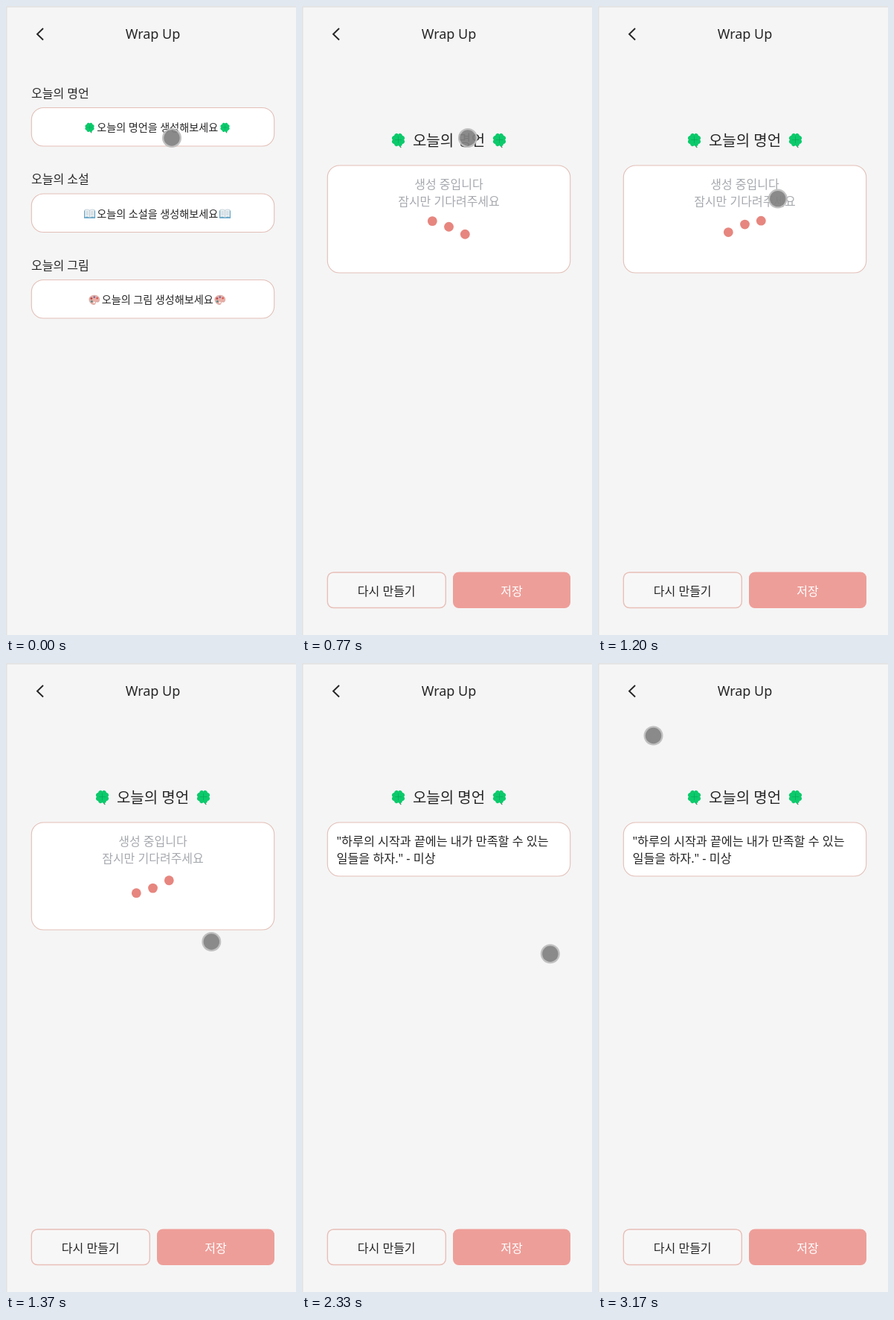
Animation, 390 px wide and 844 px high, one loop 3230 ms. Source, as an HTML page:

```html
<!DOCTYPE html>
<html lang="ko">
<head>
<meta charset="utf-8">
<title>Wrap Up</title>
<style>
  html, body { margin: 0; width: 100%; height: 100%; overflow: hidden; background: #f5f5f5; }
  svg { display: block; }
  text { font: 500 16px "Noto Sans", "Noto Sans CJK KR", "Noto Sans CJK", sans-serif; fill: #252525; }
  .mid { text-anchor: middle; }
  .head { font-size: 18px; font-weight: 400; }
  .hint { font-size: 14.1px; font-weight: 400; }
  .title { font-size: 20px; }
  .wait { fill: #a6a9ae; }
  .quote { font-size: 16.2px; font-weight: 400; }
  .card { fill: #fff; stroke: #e3bfb8; stroke-width: 1.1; }
  .dots { fill: #e6867f; }
</style>
</head>
<body>
<svg width="390" height="844" viewBox="0 0 390 844">
  <defs>
    <symbol id="clover" viewBox="0 0 20 22" overflow="visible">
      <path d="M10 10Q10.5 18 13.5 20.5" fill="none" stroke="#3d9060" stroke-width="1.6" stroke-linecap="round"/>
      <g fill="#0cca6c">
        <path id="leaf" d="M10 10C5 9 3.500 5.500 4.600 2.800C6 .3 9 .6 10 2.200C11 .6 14 .3 15.400 2.800C16.500 5.500 15 9 10 10Z"/>
        <use href="#leaf" transform="rotate(90 10 10)"/>
        <use href="#leaf" transform="rotate(180 10 10)"/>
        <use href="#leaf" transform="rotate(270 10 10)"/>
      </g>
      <path d="M10 5V15M5 10H15" stroke="#08a958" stroke-width=".8"/>
    </symbol>
    <symbol id="book" viewBox="0 0 16 14" overflow="visible">
      <path d="M.5 2.500H15.500V12.800H.5Z" fill="#4f9cc4"/>
      <path d="M1.500 1.500Q5 .2 8 2Q11 .2 14.500 1.500V11.300Q11 10.200 8 11.800Q5 10.200 1.500 11.300Z" fill="#edf3f6" stroke="#a9bdc8" stroke-width=".6"/>
      <path d="M8 2V11.800M3 4H6.500M3 6H6.500M3 8H6.500M9.500 4H13M9.500 6H13M9.500 8H13" stroke="#a9bac5" stroke-width=".7"/>
    </symbol>
    <symbol id="palette" viewBox="0 0 16 14" overflow="visible">
      <path d="M1 7C0 2 6 0 10 .7C15 1.500 16 6 14.500 9C13 11 11.500 8.500 10 10C9 11.500 10 13.200 7.500 13.200C4 13.200 1.500 10.500 1 7Z" fill="#e9b0a8" stroke="#c98e87" stroke-width=".6"/>
      <circle cx="4" cy="5" r="1.500" fill="#b94b4b"/>
      <circle cx="8" cy="3" r="1.400" fill="#7b6e9c"/>
      <circle cx="12" cy="4.500" r="1.400" fill="#d8574f"/>
      <circle cx="4.500" cy="9" r="1.500" fill="#5d8b87"/>
      <circle cx="7.800" cy="10.500" r="1.100" fill="#fff"/>
    </symbol>
  </defs>

  <rect width="390" height="844" fill="#f5f5f5"/>
  <path d="M0 1H390M.7 1V844" stroke="#e1e1e1" stroke-width="1.500" fill="none"/>
  <path d="M50 30L42 37.700L50 45.500" fill="none" stroke="#252525" stroke-width="1.900"/>
  <text class="mid head" x="197.500" y="44">Wrap Up</text>

  <g id="menu"></g>

  <g id="result">
    <use href="#clover" x="120" y="170" width="19" height="21"/>
    <text class="mid title" x="197.500" y="187.500">오늘의 명언</text>
    <use href="#clover" x="256" y="170" width="19" height="21"/>
    <rect class="card" id="box" x="34.300" y="214" width="326.400" height="144" rx="16"/>
    <g id="loading">
      <text class="mid wait" x="197.500" y="245.300">생성 중입니다</text>
      <text class="mid wait" x="197.500" y="267.600">잠시만 기다려주세요</text>
      <g class="dots">
        <circle cx="175.300" r="6.400"/>
        <circle cx="197.500" r="6.400"/>
        <circle cx="219.300" r="6.400"/>
      </g>
    </g>
    <g id="answer">
      <text class="quote" x="46.500" y="245.300">"하루의 시작과 끝에는 내가 만족할 수 있는</text>
      <text class="quote" x="46.500" y="267.600">일들을 하자." - 미상</text>
    </g>
    <rect x="34.300" y="760" width="159" height="47.500" rx="8" fill="#f8f7f7" stroke="#e8bfb8" stroke-width="1.400"/>
    <text class="mid" x="113.700" y="790.800">다시 만들기</text>
    <rect x="203" y="759.500" width="158" height="48.500" rx="8" fill="#ee9e99"/>
    <text class="mid" x="282" y="790.800" style="fill:#fff">저장</text>
  </g>

  <g id="cursor" opacity=".93">
    <circle r="13" fill="#bdbdbd"/>
    <circle r="10.700" fill="#828282"/>
  </g>
</svg>
<script>
const LOOP = 3230, FRAME = 100 / 3;
const OPEN = 695, DONE = 1595;

// time, x, y
const PATH = [
  [0, 223, 177], [900, 223, 177], [1066, 228, 212], [1133, 228, 212],
  [1366, 276, 374], [1566, 364, 374], [2066, 364, 374], [2166, 340, 388],
  [2300, 340, 388], [2333, 334, 390], [2433, 282, 481], [2566, 282, 481],
  [2733, 183, 773], [2833, 183, 773], [2900, 156, 797], [3100, 156, 797],
  [3166, 74.5, 97.5]
];

const $ = id => document.getElementById(id);
const dots = document.querySelectorAll('.dots circle');

const menuItem = (top, label, hint, icon, x1, x2, w, h) => `
  <text x="34" y="${top - 13.8}">${label}</text>
  <rect class="card" x="34.3" y="${top}" width="326.4" height="51.500" rx="16"/>
  <use href="#${icon}" x="${x1}" y="${top + 27 - h / 2}" width="${w}" height="${h}"/>
  <text class="mid hint" x="203.7" y="${top + 31.500}">${hint}</text>
  <use href="#${icon}" x="${x2}" y="${top + 27 - h / 2}" width="${w}" height="${h}"/>`;

$('menu').innerHTML =
  menuItem(136.5, '오늘의 명언', '오늘의 명언을 생성해보세요', 'clover', 105.500, 287.500, 14, 15) +
  menuItem(252, '오늘의 소설', '오늘의 소설을 생성해보세요', 'book', 104.500, 286.500, 16, 14) +
  menuItem(367.5, '오늘의 그림', '오늘의 그림 생성해보세요', 'palette', 111, 280, 15.5, 14);

function pointAt(t) {
  const i = PATH.findIndex(p => p[0] > t);
  if (i < 0) return PATH[PATH.length - 1].slice(1);
  const [t0, x0, y0] = PATH[i - 1], [t1, x1, y1] = PATH[i];
  const k = (t - t0) / (t1 - t0);
  return [x0 + (x1 - x0) * k, y0 + (y1 - y0) * k];
}

const show = (id, on) => $(id).setAttribute('display', on ? 'inline' : 'none');

function draw(now) {
  const t = Math.floor((now % LOOP + 4) / FRAME) * FRAME;
  show('menu', t < OPEN);
  show('result', t >= OPEN);
  show('loading', t < DONE);
  show('answer', t >= DONE);
  $('box').setAttribute('height', t < DONE ? 144 : 72);
  dots.forEach((dot, i) => {
    const phase = 1.36 + (t - 1067) * 0.00547 - i * 1.07;
    dot.setAttribute('cy', 298.5 - 10.3 * Math.cos(phase));
  });
  $('cursor').setAttribute('transform', `translate(${pointAt(t)})`);
}

const start = performance.now();
function tick() {
  draw(performance.now() - start);
  requestAnimationFrame(tick);
}
tick();
</script>
</body>
</html>
```
